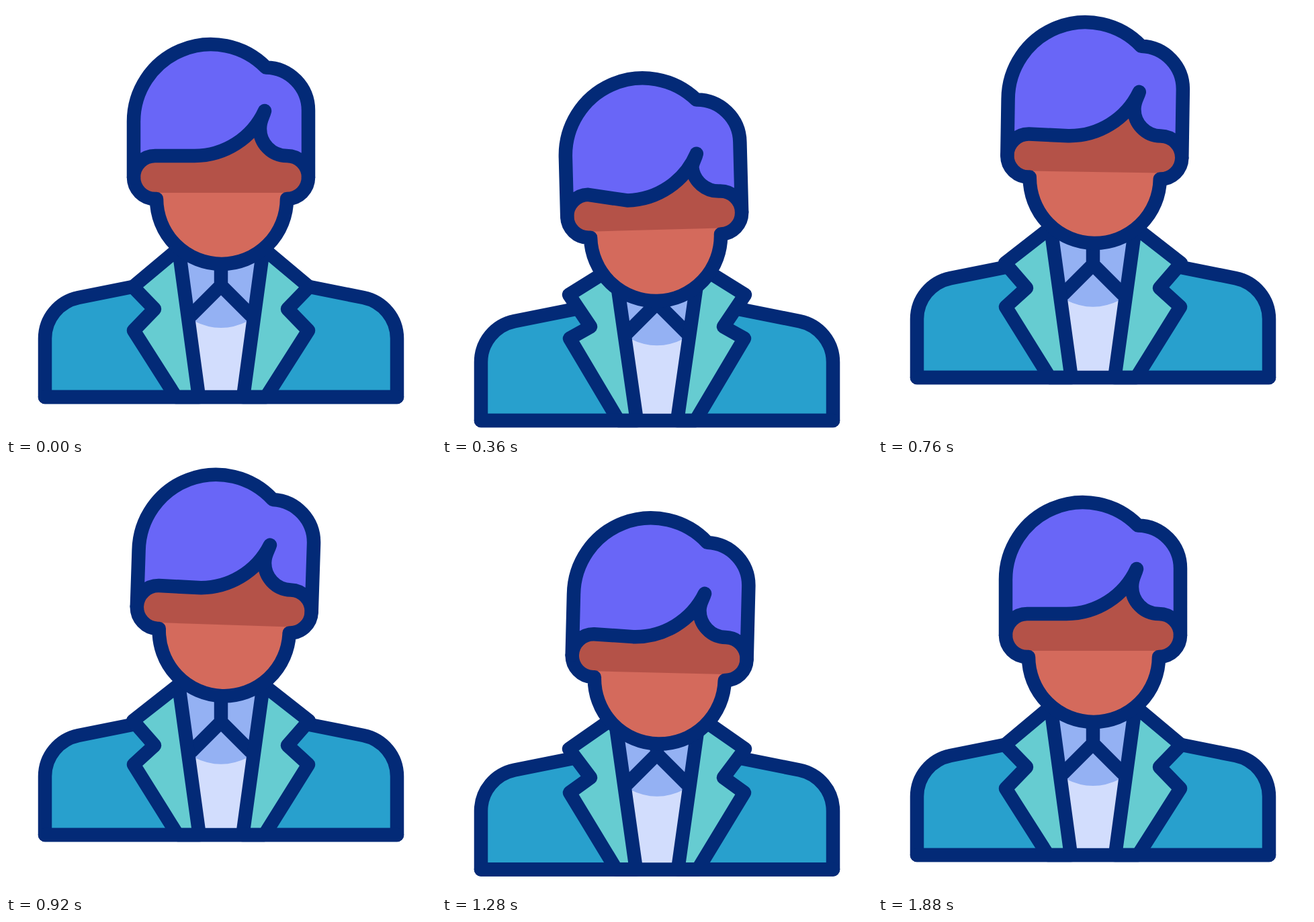
These frames come from a looping animation (640 by 640 pixels, 2240 ms). An HTML page:

```html
<!DOCTYPE html>
<html lang="en">
<head>
<meta charset="utf-8">
<title>Bouncing man in a suit</title>
<style>
  html, body { margin: 0; width: 100%; height: 100%; overflow: hidden; background: #fff; }
  svg { display: block; width: 100%; height: 100%; }
  .line { stroke: #032a77; stroke-width: 20.5; stroke-linecap: round; stroke-linejoin: round; }
</style>
</head>
<body>
<svg viewBox="0 0 640 640">
  <g id="body">
    <path class="line" fill="#28a0cd" d="M58 582V495C58 465 79 440 108 434L208 414H432L532 434C561 440 582 465 582 495V582Z"/>
    <path fill="#d2ddfd" d="M258 400H382L354 582H286Z"/>
    <g id="shirt">
      <path fill="#94b1f3" d="M262 360H378L360 469Q320 489 280 469Z"/>
      <path class="line" fill="none" d="M320 370V416M276 460L320 416L364 460"/>
    </g>
    <path id="lapel" class="line" fill="#66ccd1"/>
    <use href="#lapel" transform="translate(640 0) scale(-1 1)"/>
    <path class="line" d="M58 582H582"/>
  </g>
  <g id="head">
    <path fill="#b45248" d="M222 223H280L378 170L418 223A32 32 0 0 1 418 287H222A32 32 0 0 1 222 223Z"/>
    <path fill="#d46a5c" d="M224 278H418V287A97 97 0 0 1 224 287Z"/>
    <path class="line" fill="none" d="M190 255A32 32 0 0 0 222 287H224A97 97 0 0 0 418 287A32 32 0 0 0 450 255"/>
    <path id="hair" class="line" fill="#6966f7"/>
  </g>
</svg>
<script>
  const LOOP = 2240, STEP = 40, FIRST = 400, BEAT = 440;

  // Every part swings from rest through its peaks, one per beat, and is back at rest by its end time.
  const swings = {
    body:  { peaks: [36, -34.5, 21.5], end: 1720 },
    head:  { peaks: [56.5, -42, 34], end: 1780, beat: 460 },
    tilt:  { peaks: [-1.55, 1.95], end: 1880, beat: 570 },
    crown: { peaks: [-5.5, -1.5, -9], end: 1640 },
    sweep: { peaks: [10.5, 1, 2.5], end: 1700 },
    flap:  { peaks: [1, 0.2, 0.64], end: 1780 }
  };

  const el = id => document.getElementById(id);
  const [body, shirt, lapel, head, hair] = ["body", "shirt", "lapel", "head", "hair"].map(el);

  const ease = p => (1 - Math.cos(Math.PI * p)) / 2;

  function swing({ peaks, end, beat = BEAT }, t) {
    if (t >= end) return 0;
    const count = peaks.length;
    const timeOf = i => i < 0 ? 0 : i < count ? FIRST + i * beat : end;
    const valueOf = i => peaks[i] ?? 0;
    let next = 0;
    while (timeOf(next) <= t) next++;
    const from = timeOf(next - 1), a = valueOf(next - 1);
    return a + (valueOf(next) - a) * ease((t - from) / (timeOf(next) - from));
  }

  // The collar corners lag behind the jacket more than its folds do.
  function lapelPath(flap) {
    const fold = -9 * flap, corner = -24 * flap;
    return `M257 ${361 + fold}L189 ${418 + corner}L221 ${451 + fold}` +
      `L190 ${483 + corner}L${253 + 10 * flap} 582H${287 + 3 * flap}Z`;
  }

  function hairPath(crown, sweep) {
    return `M190 255V${173.5 + crown}A115 115 0 0 1 387 ${91.5 + crown}` +
      `A64 64 0 0 1 450 ${156 + crown}V255A32 32 0 0 0 418 223` +
      `A40 40 0 0 1 378 ${182 + sweep / 2}` +
      `C378 ${170 + sweep} 383 ${164 + sweep} 385 ${156 + sweep}` +
      `A115 115 0 0 1 280 ${223 + sweep}L222 223A32 32 0 0 0 190 255Z`;
  }

  function draw(t) {
    const at = name => swing(swings[name], t);
    const flap = at("flap");
    body.setAttribute("transform", `translate(0 ${at("body")})`);
    shirt.setAttribute("transform", `translate(0 ${-9 * flap})`);
    lapel.setAttribute("d", lapelPath(flap));
    head.setAttribute("transform", `translate(0 ${at("head")}) rotate(${at("tilt")} 320 400)`);
    hair.setAttribute("d", hairPath(at("crown"), at("sweep")));
  }

  const start = performance.now();
  function tick() {
    const t = (performance.now() - start) % LOOP;
    draw(Math.floor(t / STEP) * STEP);
    requestAnimationFrame(tick);
  }
  tick();
</script>
</body>
</html>
```
